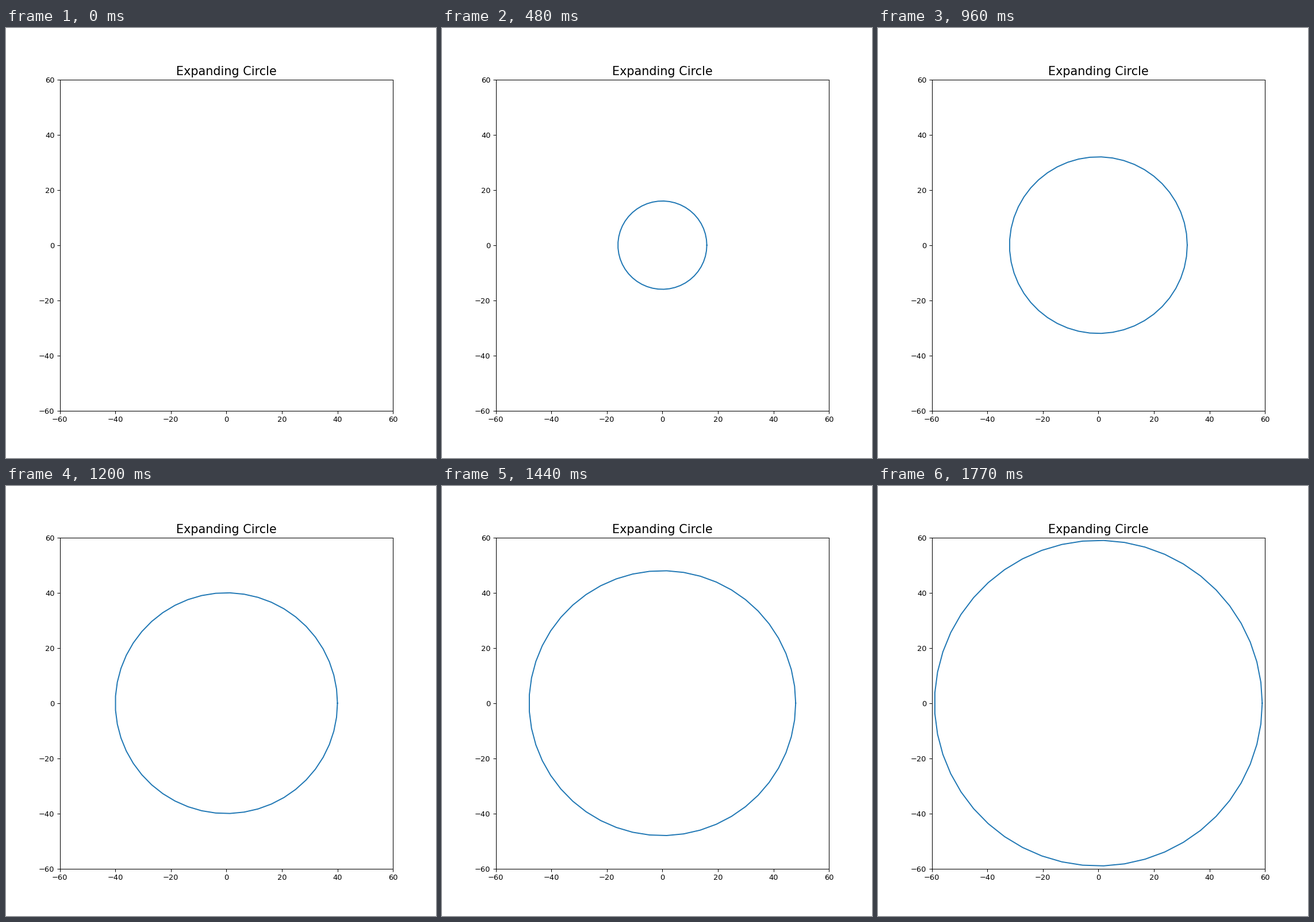
Write a matplotlib script that moves like this. It is 748x748 px and loops after 1800 ms.

```python
import matplotlib.pyplot as plt
import numpy as np
from matplotlib.animation import FuncAnimation

INCHES, DPI = 8, 93.5
FRAMES, INTERVAL = 60, 30
LIMIT = 60

plt.rcParams["font.family"] = "DejaVu Sans"

fig, ax = plt.subplots(figsize=(INCHES, INCHES), dpi=DPI)
ax.set(xlim=(-LIMIT, LIMIT), ylim=(-LIMIT, LIMIT))
ax.set_title("Expanding Circle", fontsize=16)

# 50 points keep the circle slightly polygonal
theta = np.linspace(0, 2 * np.pi, 50)
circle, = ax.plot([], [])


def update(radius):
    circle.set_data(radius * np.cos(theta), radius * np.sin(theta))
    return circle,


anim = FuncAnimation(fig, update, frames=FRAMES, interval=INTERVAL,
                     repeat=True, repeat_delay=0)

plt.show()
```
